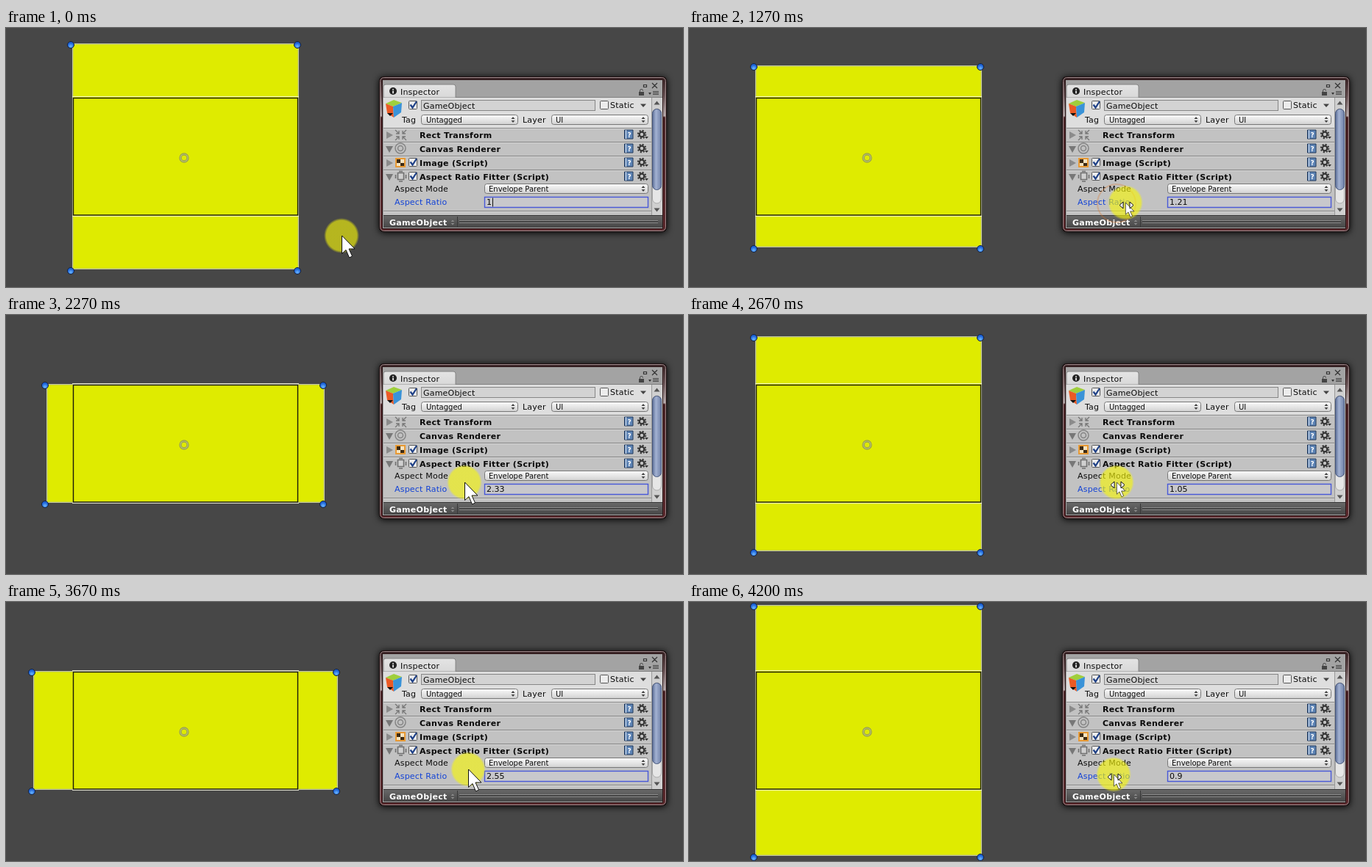
Recreate the animation shown at these times as an HTML page. Size 920 by 353 pixels, loop 4.27 s.

```html
<!DOCTYPE html>
<html lang="en">
<head>
<meta charset="utf-8">
<title>Aspect Ratio Fitter</title>
<style>
html, body { margin: 0; width: 100%; height: 100%; overflow: hidden; background: #474747; }
svg { display: block; width: 920px; height: 353px; }
text { font: 11px "DejaVu Sans", sans-serif; letter-spacing: .2px; fill: #0a0a0a; white-space: pre; }
.b { font-weight: bold; letter-spacing: .3px; }
.s { font-size: 10px; letter-spacing: 0; }
</style>
</head>
<body>
<svg viewBox="0 0 920 353">
<defs>
  <radialGradient id="ball" cy=".72"><stop stop-color="#6db9ff"/><stop offset="1" stop-color="#1c62d8"/></radialGradient>
  <radialGradient id="spot"><stop offset=".86" stop-color="#f7f708" stop-opacity=".63"/><stop offset="1" stop-color="#f7f708" stop-opacity="0"/></radialGradient>
  <linearGradient id="glass" x2="0" y2="1">
    <stop stop-color="#3a2426"/><stop offset=".12" stop-color="#6b5557"/><stop offset=".25" stop-color="#b5aaab"/>
    <stop offset=".26" stop-color="#4b2528"/><stop offset="1" stop-color="#5c2a2e"/>
  </linearGradient>
  <linearGradient id="pop" x2="0" y2="1"><stop stop-color="#fafafa"/><stop offset="1" stop-color="#d2d2d2"/></linearGradient>
  <linearGradient id="tab" x2="0" y2="1"><stop stop-color="#e4e4e4"/><stop offset="1" stop-color="#d8d8d8"/></linearGradient>
  <linearGradient id="foot" x2="0" y2="1"><stop stop-color="#6a6a6a"/><stop offset="1" stop-color="#474747"/></linearGradient>
  <linearGradient id="thumb"><stop stop-color="#5d6f98"/><stop offset=".4" stop-color="#a3b2d2"/><stop offset="1" stop-color="#6e7fa6"/></linearGradient>
  <circle id="dot" r="4.5" fill="url(#ball)" stroke="#14203a"/>
  <g id="box"><rect x=".5" y=".5" width="11" height="11" rx="1" fill="#ececec" stroke="#555"/></g>
  <g id="check"><use href="#box"/><path d="M2.5 5.5l3 4L11 1" fill="none" stroke="#1d3f86" stroke-width="2.2"/></g>
  <path id="updown" d="M-2.5 -1L0 -4 2.5 -1zM-2.5 1L0 4 2.5 1z" fill="#444"/>
  <path id="right" d="M-4 -5L5 0 -4 5z" fill="#8b8b8b"/>
  <path id="down" d="M-5 -4H5L0 5z" fill="#777"/>
  <g id="tools">
    <path d="M-5.5 -6H6V6H-5.5z" fill="#5d83b4" stroke="#233a5c"/><path d="M-3.5 -6V6" stroke="#dfe8f3"/>
    <text class="s b" x="-1.5" y="3.5" style="font-size:9px;fill:#fff">?</text>
    <circle cx="18" r="3.3" fill="none" stroke="#333" stroke-width="2.2"/>
    <circle cx="18" r="5.2" fill="none" stroke="#333" stroke-width="2" stroke-dasharray="2.04"/>
    <path d="M22 3h5l-2.5 3z" fill="#333"/>
  </g>
</defs>

<!-- scene view -->
<rect id="shape" fill="#dfeb00" stroke="#c4c8a0"/>
<rect id="inner" fill="none" stroke="#c9d23c" stroke-opacity=".8"/>
<path d="M90 93.5H398M90 256.5H398" stroke="#f4f4e4" stroke-opacity=".85"/>
<rect x="91.5" y="95.5" width="305" height="159.5" fill="none" stroke="#1a1a08" stroke-width="1.4"/>
<circle cx="242" cy="177" r="5" fill="none" stroke="#98a050" stroke-width="3.4"/>
<circle cx="242" cy="177" r="5" fill="none" stroke="#b9c26a" stroke-width="1.2"/>
<g id="dots"><use href="#dot"/><use href="#dot"/><use href="#dot"/><use href="#dot"/></g>

<!-- window -->
<rect x="507" y="66" width="391" height="212" rx="6" fill="#1a0c0d" style="filter:drop-shadow(0 1px 5px #000)"/>
<rect x="508.5" y="67.5" width="388" height="209" rx="5" fill="url(#glass)" stroke="#a08c8e"/>
<rect x="511.5" y="70.5" width="381" height="203" fill="#a3a3a3" stroke="#2a1415"/>
<path d="M513 95V80q0-3 3-3H608q3 0 3 3V95z" fill="url(#tab)" stroke="#777" stroke-width=".8"/>
<path d="M611 94.5H892" stroke="#808080"/>
<rect x="513" y="95" width="365" height="41" fill="#dedede"/>
<rect x="513" y="136" width="365" height="119" fill="#c2c2c2"/>
<path d="M513 136.5H878M513 155.5H878M513 174.5H878M513 193.5H878M513 249.5H878" stroke="#858585"/>
<path d="M513 137.5H878M513 156.5H878M513 175.5H878M513 194.5H878M513 250.5H878" stroke="#d6d6d6"/>

<circle cx="526" cy="86" r="5" fill="#222"/>
<path d="M526 83v1.6M526 85.6v3.6" stroke="#fff" stroke-width="1.6"/>
<text x="536" y="91">Inspector</text>
<path d="M866.5 77.5h4v3h-4zM878 75l7 7M885 75l-7 7" fill="none" stroke="#333" stroke-width="1.2"/>
<path d="M860 87h7v5h-7z" fill="#444"/><path d="M861.5 87v-1.500a2 2 0 0 1 4 0" fill="none" stroke="#444"/>
<path d="M873 88h4l-2 3z" fill="#333"/><path d="M879 86.500h8M879 88.500h8M879 90.500h8" stroke="#444"/>

<!-- object header -->
<path d="M516 103L527 98 538 102 526 107z" fill="#9fcf3c"/>
<path d="M516 103L526 107 527 122 518 116z" fill="#ea5a25"/>
<path d="M526 107L538 102 537 115 527 122z" fill="#3a93d8"/>
<path d="M518 116h8l-4 4z" fill="#111"/>
<use href="#check" x="547" y="99"/>
<rect x="564.5" y="98.500" width="236" height="14" fill="#d3d3d3" stroke="#868686"/>
<text x="567" y="110">GameObject</text>
<use href="#box" x="807" y="99"/>
<text x="821" y="109">Static</text>
<path d="M862 103.500h8l-4 4.500z" fill="#444"/>
<text x="538" y="129">Tag</text><text x="702" y="129">Layer</text>
<g fill="url(#pop)" stroke="#777">
  <rect x="564.500" y="118.500" width="131" height="13" rx="3"/>
  <rect x="741.500" y="118.500" width="131" height="13" rx="3"/>
  <rect x="650.500" y="212.500" width="222" height="13" rx="3"/>
</g>
<text class="s" x="571" y="128.500">Untagged</text><text class="s" x="747" y="128.500">UI</text>
<text class="s" x="656" y="222.500">Envelope Parent</text>
<use href="#updown" x="689" y="125"/><use href="#updown" x="866" y="125"/><use href="#updown" x="866" y="219"/>

<!-- components -->
<use href="#right" x="521" y="146"/><use href="#down" x="521" y="165"/>
<use href="#right" x="521" y="184"/><use href="#down" x="521" y="203"/>
<path d="M529 139l5 5m0-4v4h-4M544 139l-5 5m0-4v4h4M529 153l5-5m0 4v-4h-4M544 153l-5-5m0 4v-4h4" fill="none" stroke="#777" stroke-width="1.300"/>
<g fill="none" stroke="#858585" stroke-width="1.500"><circle cx="536" cy="164" r="7"/><circle cx="536" cy="164" r="3.500"/></g>
<rect x="529" y="177" width="14" height="13" fill="#e89a35"/>
<path d="M531 179h5v5h-5zM536 184h5v4h-5z" fill="#3c2a14"/><path d="M536 179h5v5h-5zM531 184h5v4h-5z" fill="#f6e3c0"/>
<path d="M532.500 197.500h8v9h-8zM534 195.500h5M534 209h5M529.500 200v5M543.500 200v5" fill="#d0d0d0" stroke="#707070" stroke-width="1.600"/>
<use href="#check" x="547" y="177"/><use href="#check" x="547" y="196"/>
<text class="b" x="562" y="150">Rect Transform</text>
<text class="b" x="562" y="169">Canvas Renderer</text>
<text class="b" x="562" y="188">Image (Script)</text>
<text class="b" x="562" y="207">Aspect Ratio Fitter (Script)</text>
<use href="#tools" x="846" y="145"/><use href="#tools" x="846" y="164"/>
<use href="#tools" x="846" y="183"/><use href="#tools" x="846" y="202"/>
<text x="528" y="223">Aspect Mode</text>
<text x="528" y="241" style="fill:#1242d6">Aspect Ratio</text>
<rect x="650.500" y="230.500" width="222" height="14" fill="#c8c8cc" stroke="#4858d8" stroke-width="1.400"/>
<text id="value" x="653" y="241" style="letter-spacing:0"></text>
<path id="caret" d="M661.500 231.500V243.500" stroke="#111"/>

<!-- scrollbar and footer -->
<rect x="878" y="95" width="14" height="160" fill="#d0d0d0"/>
<path d="M877.500 95V255" stroke="#999"/>
<rect x="878.500" y="110" width="12" height="129" rx="6" fill="#e6e6e6" stroke="#aaa"/>
<rect x="878.500" y="110.500" width="12" height="110" rx="6" fill="url(#thumb)" stroke="#45567c"/>
<path d="M880.500 104.500h8l-4-5zM880.500 245.500h8l-4 5z" fill="#555"/>
<rect x="513" y="255" width="379" height="17" fill="url(#foot)"/>
<path d="M513 255.500H892M613.500 257V271" stroke="#383838"/>
<path d="M616 262.500H886M616 265.500H886" stroke="#8a8a8a"/><path d="M616 264H886" stroke="#333"/>
<text class="b" x="521" y="269" style="fill:#fff">GameObject</text>
<use href="#updown" transform="translate(607 265) scale(.9)" style="filter:invert(.6)"/>

<!-- pointer -->
<circle id="ring" cx="581" cy="239" fill="none" stroke="#e0701c" stroke-width="2"/>
<g id="mouse" fill="#fff" stroke="#111">
  <circle r="24" fill="url(#spot)" stroke="none"/>
  <path id="arrow" d="M.5 0V24.500L6 19.500 10.500 30 14.500 28 10 18H18z"/>
  <path id="slide" d="M-8 3.500L-3 -1V8zM11 3.500L6 -1V8z"/>
</g>
</svg>
<script>
const $ = id => document.getElementById(id);
const set = (el, attrs) => { for (const a in attrs) el.setAttribute(a, attrs[a]); };
const LOOP = 4270, CLICK = 14;

// step, pointer x, pointer y, ratio, shown ratio where it lags
const keys = [
  [3, 456, 283, 1], [11, 577, 238, 1], [CLICK, 581, 239, 1], [19, 593, 238, 1.24, 1.21],
  [27, 621, 228, 2.27], [29, 640, 228, 2.85], [31, 640, 228, 2.85], [39, 582, 228, 1.085],
  [40, 581, 228, 1.05], [42, 579, 228, .99], [43, 579, 228, .99], [47, 608, 228, 1.81, 1.74],
  [48, 614, 228, 1.963, 1.87], [53, 636, 228, 2.74], [54, 636, 228, 2.74], [55, 628, 228, 2.555, 2.55],
  [62, 579, 234, .9625], [63, 577, 235, .9]
].map(k => k.length < 5 ? [...k, k[3]] : k);

const slope = (i, c) => i < 0 || i > keys.length - 2 ? 0
  : (keys[i + 1][c] - keys[i][c]) / (keys[i + 1][0] - keys[i][0]);
const tangent = (i, c) => {
  const a = slope(i - 1, c), b = slope(i, c);
  return a * b <= 0 ? 0 : 2 * a * b / (a + b);
};

// monotone cubic through the keys
function track(step, c) {
  const k = Math.max(step, keys[0][0]);
  const i = Math.max(0, keys.findIndex(key => key[0] >= k) - 1);
  const p = keys[i], q = keys[i + 1], h = q[0] - p[0], u = (k - p[0]) / h, v = 1 - u;
  return p[c] * v * v * (1 + 2 * u) + q[c] * u * u * (3 - 2 * u)
    + h * u * v * (v * tangent(i, c) - u * tangent(i + 1, c));
}

function draw(now) {
  const step = Math.min(63, Math.floor((now % LOOP + 4) * .015));
  const [x, y, ratio, shown] = [1, 2, 3, 4].map(c => track(step, c));

  // envelope the 308 x 162 parent
  const w = Math.round(Math.max(308, 162 * ratio) / 2) * 2;
  const h = Math.round(Math.max(162, 308 / ratio));
  const left = 244 - w / 2, top = Math.round(175 - h / 2);
  set($('shape'), { x: left + .5, y: top + .5, width: w - 1, height: h - 1 });
  set($('inner'), { x: left + 1.5, y: top + 1.5, width: w - 3, height: h - 3 });
  [...$('dots').children].forEach((dot, i) =>
    set(dot, { x: left - 2 + w * (i % 2), y: top + 2 + h * (i >> 1) }));

  $('value').textContent = +shown.toFixed(2);
  set($('caret'), { opacity: +(step < CLICK) });

  const age = step - CLICK;
  set($('ring'), { r: Math.max(0, 11 + 3 * age), opacity: age < 0 ? 0 : Math.max(0, 1 - age / 7) });

  const sliding = x > 528 && x < 606 && y < 247;
  set($('mouse'), { transform: `translate(${Math.round(x)} ${Math.round(y)})` });
  set($('arrow'), { transform: sliding ? 'scale(.66)' : '' });
  set($('slide'), { opacity: +sliding });
}

const start = performance.now();
function tick() {
  draw(performance.now() - start);
  requestAnimationFrame(tick);
}
tick();
</script>
</body>
</html>
```
